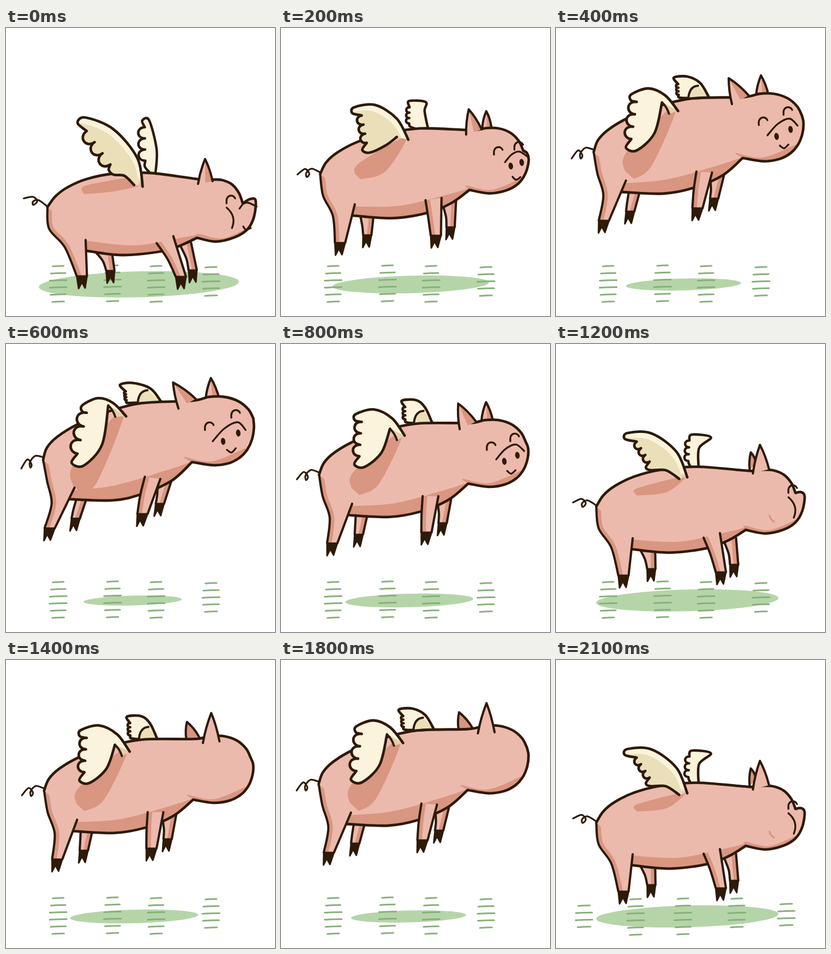
Animation of 500 by 534 pixels, one loop 2.2 s. Source, as an HTML page:

```html
<!DOCTYPE html>
<html lang="en">
<head>
<meta charset="utf-8">
<title>Flying pig</title>
<style>
html, body { margin: 0; width: 100%; height: 100%; overflow: hidden; background: #fff; }
svg { display: block; width: 100%; height: 100%; }
</style>
</head>
<body>
<svg id="stage" viewBox="0 0 500 534" fill="none" stroke-linecap="round" stroke-linejoin="round"></svg>
<script>
const INK = '#2e1a08', PINK = '#ecbaac', SHADE = '#d99681';
const CREAM = '#fcf3dc', TAN = '#ebdfb9';

// Height above the ground for each step of the hop: 0 standing, 1 high.
const RISE = [0, .3, .6, .88, 1, 1.15];
const HEAD_LIFT = 163;

// Key shapes as [standing, high]; "|" marks a corner.
const trunk = [
  '77,332 92,312 115,295 150,280 200,270 270,269 362,281 385,281 402,282 420,290 433,306 440,325|454,317 464,320 461,350 449,373 425,388 390,396 355,389|325,403 290,414 215,421 149,413',
  '70,230 78,208 98,188 135,166 180,148 250,131 348,128 378,122 405,122 430,130 448,145 457,162|460,176 458,196 450,216 436,232 415,243 385,247 347,241|310,273 257,296 200,307 120,304'];
const tail = [
  '33,316 50,313 58,321 51,328 50,322 60,319 77,331',
  '29,242 41,227 49,236 46,242 45,233 55,222 71,226'];
const underside = [
  '145,394 240,403 330,388 352,384|360,382 402,390 452,370',
  '118,288 205,281 300,255 345,240|335,232 385,240 446,216'];

// Legs: outer side, ankle, top of the inner side.
const legs = {
  rear: ['77,332 80,372 109,406/141,460/148,393', '70,230 77,270 88,310/89,357/130,283'],
  front: ['280,399 300,428/325,461/311,386', '261,266 256,300/263,334/290,268'],
  farRear: ['167,416 180,432/194,450/197,416', '135,306 132,325/138,340/155,306'],
  farFront: ['322,400 335,427/347,449/344,398', '287,282 288,300/294,316/313,270']
};

// Wings raised, level and lowered: leading edge / last feather gap / way back to the body.
const nearWing = [
  '254,294 244,241 200,188 148,166 133,176 150,191/194,253/191,263 200,272 220,274 238,291',
  '244,247 224,200 178,166 133,165 128,176 150,181/174,218/167,229 176,234 204,234 229,250',
  '227,154 203,125 172,112 140,123 139,134 150,137/140,206/130,222 150,227 183,195 197,138'];
const farWing = [
  '278,268 280,225 266,171 253,172 258,184/259,246/258,257 267,268',
  '265,229 266,193 288,173 252,168 248,179/246,217/247,222 251,229',
  '284,128 268,102 244,90 219,92 227,104/228,124/229,129 246,130'];
const castShadow = [
  '140,300 152,291 238,277 254,290 200,303 145,308',
  '144,274 155,266 225,248 240,248 205,275 150,281',
  '128,265 130,232 205,155 222,156 178,255 145,280'];

// Head in profile and fully turned: near ear / far ear / eyes / snout / mouth / nostrils.
const toViewer = [
  '357,126 370,80 384,121/376,114 382,90 388,114/418,154 450,152/434,172 441,163 450,161 466,168/441,205 446,211 455,208/440,183 456,181',
  '327,141 321,93 358,125/372,124 381,88 395,124/385,172 431,153/393,199 412,178 434,168 449,181/416,218 424,223 432,216/410,201 436,188'];
const turnedAway = [
  '366,126 379,73 396,118/360,120 362,87 372,106',
  '366,136 382,80 397,134/330,129 331,97 356,126'];

// Grass columns on alternate steps: [centre, top, blades].
const grass = [
  [[97, 442, 6], [198, 441, 6], [279, 442, 6], [381, 444, 5]],
  [[52, 456, 4], [148, 444, 6], [236, 443, 6], [336, 443, 5], [428, 453, 4]]];

function mix([a, b], t) {
  const end = b.match(/[\d.]+/g);
  let i = 0;
  return a.replace(/[\d.]+/g, n => (+n + (end[i++] - n) * t).toFixed(1));
}

const points = s => s.split(/[ |]/).map(p => p.split(',').map(Number));

function spline(s, start = 'M') {
  let last, d = '';
  for (const run of s.split('|')) {
    const p = points(run);
    if (last) p.unshift(last); else d = start + p[0];
    for (let i = 1; i < p.length; i++) {
      const b = p[i - 1], c = p[i], a = p[i - 2] || b, e = p[i + 1] || c;
      d += `C${b.map((v, k) => v + (c[k] - a[k]) / 6)} ${c.map((v, k) => v - (e[k] - b[k]) / 6)} ${c}`;
    }
    last = p[p.length - 1];
  }
  return d;
}

const fill = (d, color, more = '') => `<path d="${d}" fill="${color}" ${more}/>`;
const line = (d, width = 3.4, color = INK) => `<path d="${d}" stroke="${color}" stroke-width="${width}"/>`;
const clip = (id, d, body) => `<clipPath id="${id}"><path d="${d}"/></clipPath><g clip-path="url(#${id})">${body}</g>`;

function leg(name, u) {
  const far = name.startsWith('far'), half = far ? 7.7 : 9.5, lean = -4 * u;
  const [side, ankle, top] = mix(legs[name], u).split('/');
  const [x, y] = points(ankle)[0];
  const outer = spline(`${side} ${x - half},${y}`), inner = `L${x + half},${y}L${top}`;
  const innerLine = inner.replace('L', 'M');
  const hoof = `M${x - half},${y}L${x + lean - 6},${y + 23}L${x + lean},${y + 11}L${x + lean + 6},${y + 22}L${x + half},${y}Z`;
  return fill(outer + inner, PINK) +
    clip(name, outer + inner, line(far ? innerLine : outer, 17, SHADE)) +
    line(outer, 4.2) + line(innerLine, 4.2) +
    `<path d="${hoof}" fill="${INK}" stroke="${INK}" stroke-width="3"/>`;
}

// Three rounded feathers bulging out from the line a to b.
function feathers([ax, ay], [bx, by]) {
  const dx = (bx - ax) / 3, dy = (by - ay) / 3, nx = -dy * .8, ny = dx * .8;
  return `c${nx},${ny} ${dx + nx},${dy + ny} ${dx},${dy}`.repeat(3);
}

const flap = (keys, m, t) => m ? mix(keys.slice(1), t) : keys[0];

function wing(keys, m, t, far) {
  const [edge, gap, back] = flap(keys, m, t).split('/');
  const lead = points(edge), root = lead[0], end = points(back).pop();
  const d = spline(edge) + feathers(lead[lead.length - 1], points(gap)[0]) + spline(`${gap} ${back}`, 'L');
  if (m < 3) {
    return far ? fill(d, CREAM) + line(d, 4.6) :
      fill(d, 'url(#cream)') + clip('wing', d, fill(d, 'url(#tan)', 'transform="translate(-6 11)"')) + line(d, 4.8);
  }
  const fold = `M${end}` + (far ? 'q2,-22 18,-23' : 'q9,8 13,21');
  return fill(d, CREAM) + fill(`${fold}L${root}Z`, far ? TAN : '#e3cfa9') + line(d, 4.8) + line(fold, 4);
}

function ear(s, color, shaded) {
  const [[ax, ay], [x, y], [bx, by]] = points(s);
  const left = `M${ax},${ay}Q${(ax + x) / 2 - 3},${(ay + y) / 2} ${x},${y}`;
  const d = left + `Q${(bx + x) / 2 + 2},${(by + y) / 2 - 3} ${bx},${by}`;
  return fill(d, color) +
    (shaded ? fill(`M${x},${y}L${bx},${by}L${(ax + bx) / 2},${(ay + by) / 2}Z`, SHADE) : '') + line(d, 4.2);
}

const arch = ([x, y]) => line(`M${x - 8},${y + 8}C${x - 10},${y - 9} ${x + 5},${y - 9} ${x + 8},${y - 1}`);

function face([eyes, snout, mouth, nostrils], m, away) {
  const turned = m > 1, [eye, otherEye] = points(eyes);
  if (away && turned) return '';
  let out = arch(eye);
  if (!turned) {
    const k = m && !away ? .55 : 1;
    out += line(`M420,208q${9 * k},${-22 * k} ${-10 * k},${-38 * k}`);
    if (m) out += line('M375,204q1,7 8,11', 3.5, SHADE);
  }
  if (away) return `<g transform="translate(22)">${out}</g>`;
  out += line(spline(snout)) + line(spline(mouth));
  if (turned) out += arch(otherEye);
  points(nostrils).slice(turned ? 0 : 1).forEach(([x, y]) => {
    if (m) out += `<ellipse cx="${x}" cy="${y}" rx="${turned ? 4.2 : 2.8}" ry="6.5" fill="${INK}" transform="rotate(-8 ${x} ${y})"/>`;
  });
  return out;
}

function meadow(u, odd) {
  let out = `<ellipse cx="${247 - 10 * u}" cy="475.5" rx="${186 - 79 * u ** 1.3}" ry="${24 - 13 * u}" fill="#b5d5a9" transform="rotate(-1.5 240 475)"/>`;
  for (const [x, top, blades] of grass[odd]) {
    for (let i = 0; i < blades; i++) {
      const w = 17 + 15 * Math.sin(Math.PI * (i + .4) / blades);
      out += line(`M${x - w / 2},${top + 13.2 * i}q${w / 2},-1 ${w},-1`, 3, '#87b07b');
    }
  }
  return out;
}

const gradients = Object.entries({ cream: CREAM, tan: TAN }).map(([id, c]) =>
  `<linearGradient id="${id}" x2="0" y2="1"><stop offset=".86" stop-color="${c}"/><stop offset="1" stop-color="#e0a994"/></linearGradient>`).join('');

// The hop goes up and down in 11 steps; the head faces the viewer on one hop and away on the next.
function picture(n) {
  const k = n % 11, m = Math.min(k, 11 - k), away = n > 11;
  const u = RISE[m], t = Math.max(0, (u - .3) / .7);
  const body = spline(mix(trunk, u));
  const [, , ...features] = mix(toViewer, t).split('/');
  const [nearEar, farEar] = mix(away ? turnedAway : toViewer, t).split('/');
  const onHead = s => `<g transform="translate(0 ${HEAD_LIFT * (1 - u)})">${s}</g>`;
  return `<defs>${gradients}</defs>` + meadow(u, n % 2) +
    leg('farRear', u) + leg('farFront', u) +
    wing(farWing, m, t, true) +
    (m || away ? onHead(ear(farEar, away ? SHADE : PINK, !away)) : '') +
    fill(body, PINK) +
    clip('body', body, fill(spline(mix(underside, u)) + 'L500,600L100,600Z', SHADE) +
      fill(spline(flap(castShadow, m, t)) + 'Z', SHADE)) +
    line(body, 4.8) + line(spline(mix(tail, u)), 3.2) +
    leg('rear', u) + leg('front', u) +
    wing(nearWing, m, t, false) +
    onHead(ear(nearEar, PINK, !away) + face(features, m, away));
}

const stage = document.getElementById('stage');
let shown = -1;
function tick() {
  const n = Math.floor(performance.now() % 2200 / 100);
  if (n !== shown) stage.innerHTML = picture(shown = n);
  requestAnimationFrame(tick);
}
tick();
</script>
</body>
</html>
```
